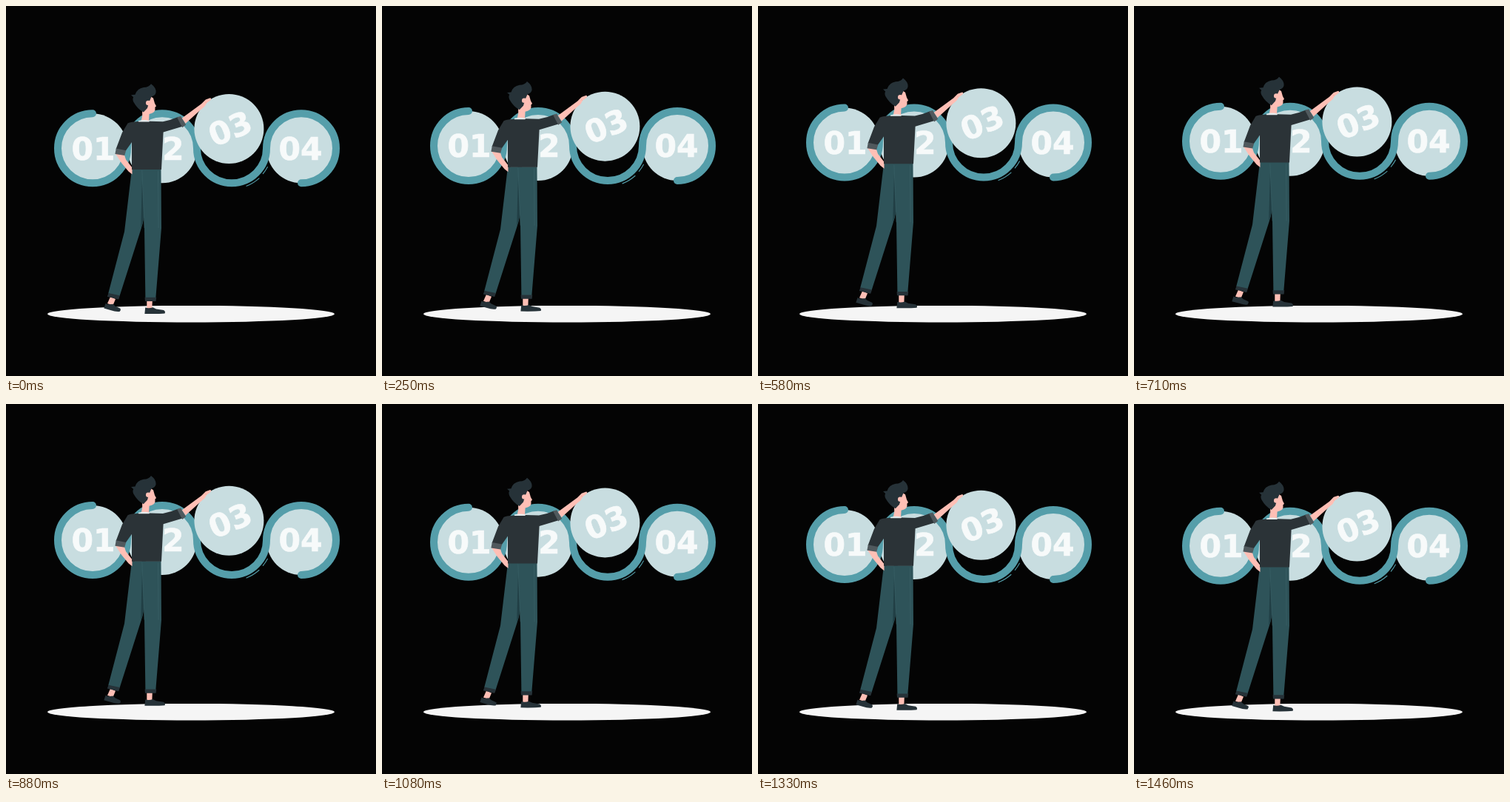
An HTML page that plays this animation: 500x500 px, repeating every 1.5 s.

```html
<!DOCTYPE html>
<html lang="en">
<head>
<meta charset="utf-8">
<title>Four steps</title>
<style>
html, body { margin: 0; width: 100%; height: 100%; overflow: hidden; background: #040404; }
svg { display: block; width: 100%; height: 100%; }
text { font: bold 42.5px "DejaVu Sans", sans-serif; text-anchor: middle; fill: #f7fafa; stroke: #f7fafa; stroke-width: .7; }
.disc { fill: #c8dde0; }
.line { fill: none; stroke: #559eaa; stroke-linecap: round; }
.skin { fill: #ffbfb5; }
.dark { fill: #263238; }
.shirt { fill: #2b3337; }
.cuff { fill: #50595d; }
.cloth { fill: #2e5359; }
.shade { fill: #213f45; }
</style>
</head>
<body>
<svg viewBox="0 0 500 500">
  <ellipse cx="250" cy="416.2" rx="194" ry="11.3" fill="#f5f5f5"/>
  <g id="float">
    <g id="discs"></g>
    <path class="line" stroke-width="10" d="M117 145.3a47 47 0 0 0 0 94a47 47 0 0 0 47-47a47 47 0 0 1 94 0a47 47 0 0 0 94 0a47 47 0 1 1 47 47"/>
    <path class="line" stroke-width="1.1" d="M325 243.2A55 55 0 0 0 342 232.8M347.3 226.7A55 55 0 0 0 353.4 217.6"/>
    <g transform="translate(301.4 166)">
      <circle class="disc" r="47"/>
      <text transform="translate(1.4 -.8) rotate(-22)" y="15.5">03</text>
    </g>

    <!-- legs and shoes -->
    <path class="skin" d="M141 393L148 396L144.5 404.5L137 402ZM190.3 398H197.8L197.4 409H190.3Z"/>
    <path class="dark" d="M134.5 402Q138 404 144.5 402.8L147.5 405.5L154.5 408.8Q155.8 411 153.5 413Q148 413.6 142 411.3L132.3 408.6Z"/>
    <path class="dark" d="M188.2 407.6Q193 409 198.5 407.3L203 409.4L213 411Q216 412.8 214.5 415.4Q206 416.2 187.4 415.9Z"/>
    <path class="cloth" d="M170 220.5H189L187 282Q185.5 294 181 306L153.5 392L138.2 388.5L160 305Z"/>
    <path class="shade" d="M184 234L188 262L187 284L182.2 301Z"/>
    <path class="cloth" d="M183.5 220.5H209.5L210 300L202.3 395H188.4L187 300Z"/>
    <path fill="none" stroke="#3e666c" stroke-width=".5" d="M183.8 222L187 300M205.5 223L206 300"/>
    <path class="dark" d="M138.5 388L154 391.3L152.2 396.4L136.8 392.8ZM187.6 393.8H203.2L202.6 399H188Z"/>

    <!-- bent arm -->
    <path class="skin" d="M147.6 199L159.5 200L162 207.5L170.5 218.5V227.5L165.5 223.5L156 212Z"/>

    <!-- head -->
    <path class="skin" d="M184 136L195 122L199 124.5L201 131.5L203 135.2L201.4 137L201.5 140Q201 144.5 193.6 146L193 156.5H182.5L184.2 148Z"/>
    <path class="dark" d="M169 120.3L174.5 119.8Q177 111.5 186 110Q193 110 196 105.3Q203 110.5 202.6 116.5Q202 121 196.6 122.6L193.5 129.5L191 138L185.8 143.6Q177.5 139 172.5 130Q170.5 126 172.2 123.2Z"/>
    <circle class="skin" cx="192.2" cy="131" r="3.2"/>

    <!-- shirt -->
    <path class="shirt" d="M164.5 158.5Q167 156.7 178 156L194 155.7L212 156.2Q222 154.5 233 149.8L239.3 162.5L212.6 170.5L210 221H170V184L161.5 196L148.5 193.6L157 171Z"/>
    <path fill="#e5eced" d="M179 155.2Q187 152.8 194 155.2L193.4 156.6H179Z"/>
    <path class="cuff" d="M148.8 192.6L162.2 195.2L160.2 202L147.4 200ZM231.2 150.6L236 148.8L243.2 160.5L238.2 164.2Z"/>
    <path class="skin" d="M237.8 151.4L264 132.2L269.8 126.4L276 124.2Q278.2 125.2 276.4 127.2L271 131.2L268.6 135.5L263 140.3L242.6 158.8Z"/>
    <path fill="none" stroke="#e89a90" stroke-width=".5" d="M269 129.5L271 131.2"/>
  </g>
</svg>
<script>
const LOOP = 1500, RISE = 10;
const float = document.getElementById("float");

document.getElementById("discs").innerHTML =
  [["01", 117, 118], ["02", 211, 211], ["04", 399, 398]].map(([label, x, textX]) =>
    `<circle class="disc" cx="${x}" cy="192.3" r="47"/><text x="${textX}" y="207.7">${label}</text>`
  ).join("");

// Linear rise and fall
function draw(now) {
  const phase = (now % LOOP) / LOOP;
  const lift = RISE * (1 - Math.abs(1 - 2 * phase));
  float.setAttribute("transform", `translate(0 ${-lift.toFixed(3)})`);
}

let start;
function tick(now) {
  start ??= now;
  draw(now - start);
  requestAnimationFrame(tick);
}
draw(0);
requestAnimationFrame(tick);
</script>
</body>
</html>
```
